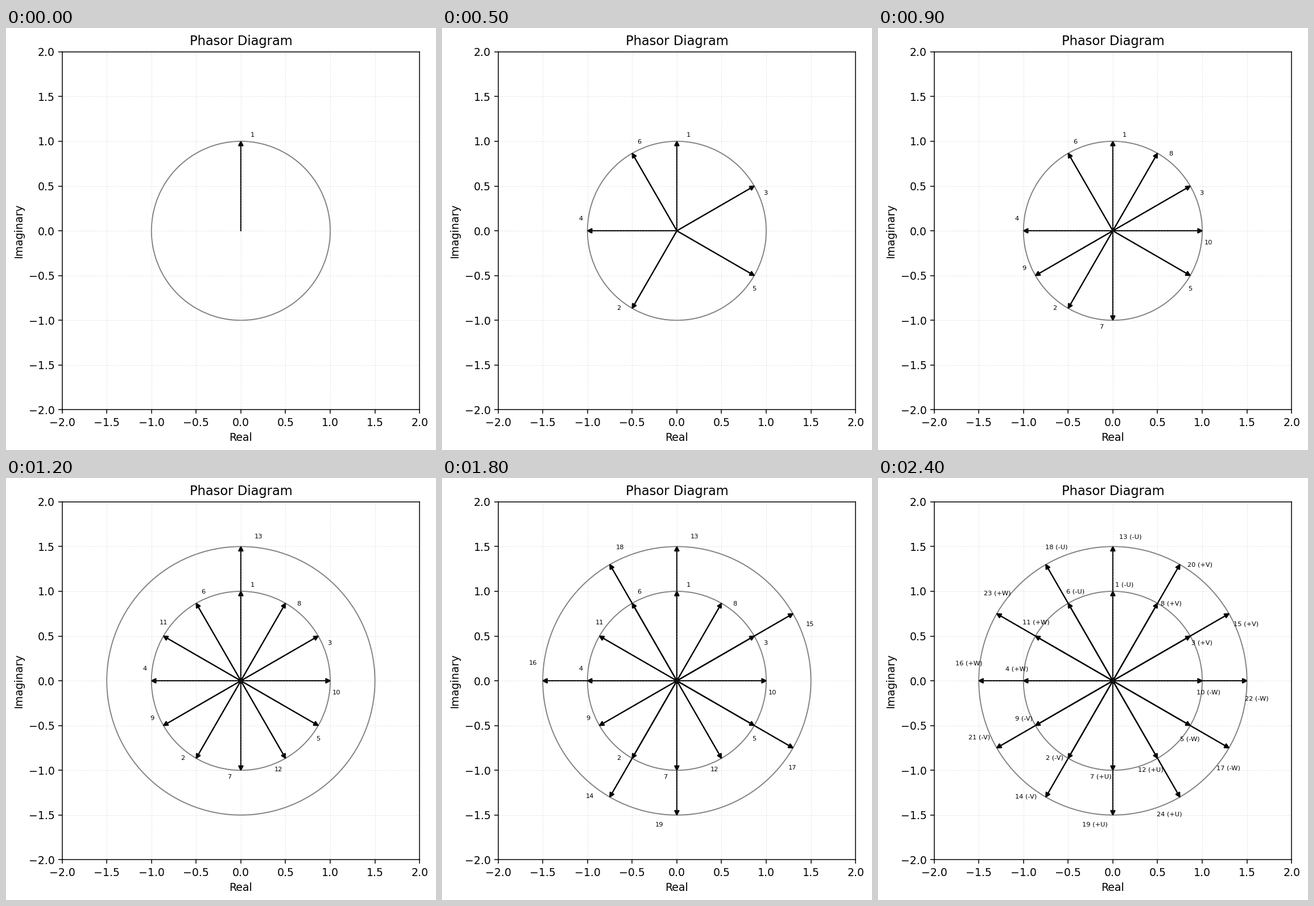
Recreate the animation shown at these times as a matplotlib script. Size 756 px wide and 741 px high, loop 2.5 s.

```python
import numpy as np
import matplotlib.pyplot as plt
from matplotlib.animation import FuncAnimation
from matplotlib.patches import Circle, FancyArrow

W, H, DPI = 756, 741, 136
LEFT, BOTTOM, SIDE = 98.6, 70.6, 628.6   # axes box in pixels
SLOTS, STEP = 12, 150                    # slots per ring, electrical angle in degrees
RADII = (1.0, 1.5)
PHASES = ("-W", "+V", "-U", "+W", "-V", "+U")
COUNT = SLOTS * len(RADII)

plt.rcParams["font.family"] = "DejaVu Sans"
fig = plt.figure(figsize=((W + 1e-6) / DPI, (H + 1e-6) / DPI), dpi=DPI, facecolor="white")
ax = fig.add_axes([LEFT / W, BOTTOM / H, SIDE / W, SIDE / H])
ax.set(xlim=(-2, 2), ylim=(-2, 2), xlabel="Real", ylabel="Imaginary", title="Phasor Diagram")
ticks = np.arange(-2, 2.1, 0.5)
ax.set_xticks(ticks)
ax.set_yticks(ticks)
ax.grid(True, linestyle="--", linewidth=0.5, alpha=0.3)


def polar(radius, degrees):
    a = np.radians(degrees)
    return radius * np.cos(a), radius * np.sin(a)


def phase(angle):
    return PHASES[(angle // 30 + 1) // 2 % 6]


rings = [ax.add_patch(Circle((0, 0), r, fill=False, ec="gray", lw=1)) for r in RADII]
arrows, labels, names = [], [], []
for k in range(COUNT):
    radius = RADII[k // SLOTS]
    angle = (90 + STEP * k) % 360
    arrows.append(ax.add_patch(FancyArrow(
        0, 0, *polar(radius, angle), width=0.001, head_width=0.05, head_length=0.05,
        length_includes_head=True, fc="black", ec="black", lw=1)))
    labels.append(ax.text(*polar(1.08 * radius, angle - 7), "", fontsize=6,
                          ha="center", va="center"))
    names.append(phase(angle))


def draw(i):
    shown = min(i + 1, COUNT)
    named = i >= COUNT               # the last step adds the phase names
    for n, ring in enumerate(rings):
        ring.set_visible(shown > n * SLOTS)
    for k in range(COUNT):
        arrows[k].set_visible(k < shown)
        labels[k].set_visible(k < shown)
        labels[k].set_text(f"{k + 1} ({names[k]})" if named else f"{k + 1}")
    return rings + arrows + labels


anim = FuncAnimation(fig, draw, frames=COUNT + 1, interval=100, repeat=True)
plt.show()
```
